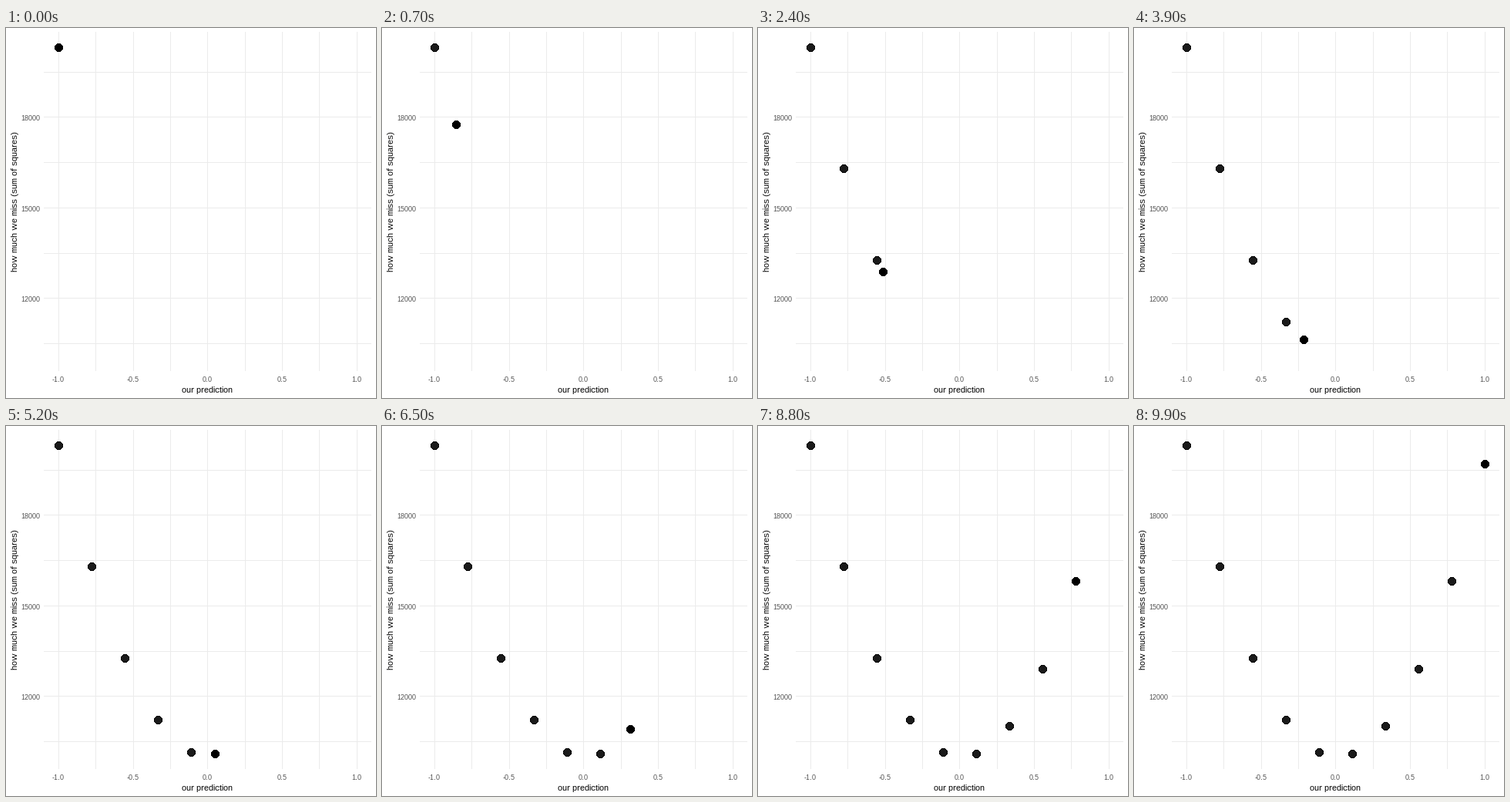
A matplotlib script that plays this animation: 480 px wide and 480 px high, repeating every 10000 ms.

```python
import matplotlib as mpl
import matplotlib.pyplot as plt
import numpy as np
from matplotlib.animation import FuncAnimation
from matplotlib.collections import LineCollection
from matplotlib.patches import Circle

SIZE, DPI = 480, 72
FRAMES, INTERVAL = 100, 100
STEPS = 11  # frames from one point to the next

mpl.rcParams.update({
    "font.family": "Liberation Sans",
    "text.hinting": "native",
    "text.hinting_factor": 1,
    "toolbar": "None",
})

# Ten predictions on a parabola, in pixels
P = np.linspace(-1, 1, 10)
POINTS = np.column_stack([261.5 + 193.3 * P,
                          428.75 + 12.1 * P - 391.75 * P ** 2])
GRID_X = [68, 116, 165, 213, 261, 310, 358, 406, 455]
GRID_Y = [57, 115, 174, 233, 292, 350, 409]

fig = plt.figure(figsize=(SIZE / DPI, SIZE / DPI), dpi=DPI, facecolor="white")
ax = fig.add_axes([0, 0, 1, 1])
ax.set(xlim=(0, SIZE), ylim=(SIZE, 0))
ax.axis("off")

rows = [[(49, y + 0.5), (474, y + 0.5)] for y in GRID_Y]
cols = [[(x + 0.5, 5), (x + 0.5, 445)] for x in GRID_X]
grid = LineCollection(rows + cols, colors="#ebebeb", linewidths=1, zorder=1)
grid.set_snap(False)
ax.add_collection(grid)


def label(x, y, text, size, color, ha="center", **kw):
    ax.text(x, y, text, fontsize=size, color=color, ha=ha, va="baseline", **kw)


for x, value in zip(GRID_X[::2], (-1, -0.5, 0, 0.5, 1)):
    label(x, 459, f"{value:.1f}", 9, "#4d4d4d")
for y, value in zip(GRID_Y[1::2], (18000, 15000, 12000)):
    label(44, y + 5, str(value), 9, "#4d4d4d", ha="right")
label(261, 473, "our prediction", 11, "black")
label(15, 225.5, "how much we miss (sum of squares)", 11, "black",
      rotation=90, rotation_mode="anchor")


def pixel(pos):
    """Centre of the pixel nearest to pos."""
    return np.round(pos) + 0.5


def disc(pos, radius, color, zorder):
    return ax.add_patch(Circle(pixel(pos), radius, facecolor=color, linewidth=0,
                               antialiased=False, zorder=zorder))


marks = [(disc(p, 4.9, "#030303", 2), disc(p, 3.9, "#1a1a1a", 3))
         for p in POINTS]
dot = disc(POINTS[0], 4.9, "black", 4)


def update(frame):
    i, step = divmod(frame, STEPS)
    a, b = POINTS[i], POINTS[min(i + 1, len(POINTS) - 1)]
    dot.center = pixel(a + (b - a) * step / STEPS)
    for k, pair in enumerate(marks):
        for patch in pair:
            patch.set_visible(k * STEPS < frame)
    return [dot, *(patch for pair in marks for patch in pair)]


anim = FuncAnimation(fig, update, frames=FRAMES, interval=INTERVAL,
                     repeat=True, repeat_delay=0, blit=False)
plt.show()
```
